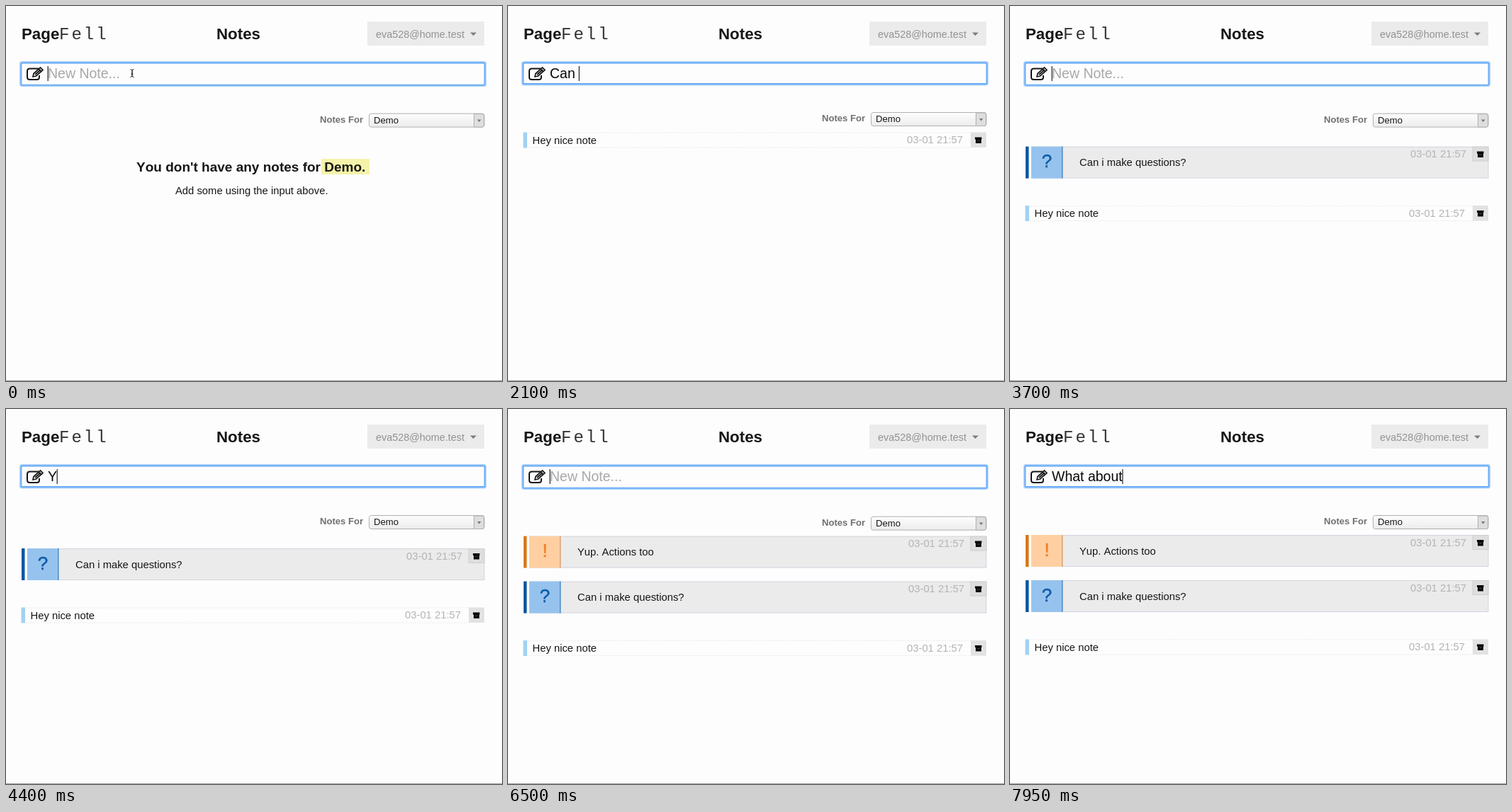
Animation, 700 px wide and 530 px high, one loop 8 s. Source, as an HTML page:

```html
<!DOCTYPE html>
<html lang="en">
<head>
<meta charset="utf-8">
<title>Notes</title>
<style>
  html, body { margin: 0; width: 100%; height: 100%; overflow: hidden; background: #fdfdfd; }
  svg { display: block; width: 700px; height: 530px; }
  text { font: 14.8px "Liberation Sans", Arial, sans-serif; font-kerning: none; fill: #161616; white-space: pre; }
  .bold { font-weight: bold; }
  .heading { font-size: 22.3px; }
  .mono { font: 24px "Liberation Mono", monospace; letter-spacing: 3px; fill: #333; }
  .entry { font-size: 19.5px; fill: #080808; }
  .small { font-size: 13.1px; }
  .date { fill: #b4b4b4; }
  .mark { font-size: 26px; text-anchor: middle; stroke-width: .5px; }
</style>
</head>
<body>
<svg viewBox="0 0 700 530">
  <defs>
    <linearGradient id="selectFill" x1="0" y1="0" x2="0" y2="1">
      <stop offset="0" stop-color="#fdfdfd"/><stop offset="1" stop-color="#ececec"/>
    </linearGradient>
    <g id="archive">
      <path d="M659 7h9.500v3h-9.500zM660 10h8v5.500h-8z" fill="#080808"/>
      <path d="M662.500 11.500h3" stroke="#666" stroke-width=".8"/>
    </g>
  </defs>
  <rect width="700" height="530" fill="#fdfdfd"/>
  <rect y="529" width="700" height="1" fill="#a3a3a3"/>

  <text class="bold heading" x="22" y="47">Page</text>
  <text class="mono" x="75" y="47">Fell</text>
  <text class="bold heading" x="297" y="47">Notes</text>
  <rect x="510" y="22" width="165" height="34" fill="#ebebeb"/>
  <text x="522" y="44.500" style="font-size:14.4px;fill:#929292">eva528@home.test</text>
  <path d="M655 37.500h9l-4.500 4.500z" fill="#7c7c7c"/>

  <rect id="glow" x="21" y="80" width="655" fill="none" stroke="#a9cffb" stroke-width="4" rx="1.500"/>
  <rect id="field" x="21.500" y="80.500" width="654" fill="#fdfdfd" stroke="#68abf6" stroke-width="1.800" rx="1"/>
  <g fill="none" stroke="#161616" stroke-width="2">
    <path d="M46 88.500H33.500q-3.500 0-3.500 3.500v8.500q0 3.500 3.500 3.500h10q3.500 0 3.500-3.500v-2.500"/>
    <path d="M38 100l1-4.500 9.500-8.500 3.500 3.500-9.500 8.500zM46 89l3.500 3.500" stroke-width="1.700"/>
    <path d="M41 97l8-7" stroke-width="1.700"/>
  </g>
  <text id="entry" class="entry" x="59" y="102"></text>
  <rect id="caret" y="85" width="1.200" height="21" fill="#222"/>
  <path id="pointer" d="M175.500 89.500q2.500 0 2.500 2v7q0 2-2.500 2M180.500 89.500q-2.500 0-2.500 2v7q0 2 2.500 2M176.500 96h3" fill="none" stroke="#222"/>

  <g id="page">
    <text class="bold small" x="443" y="163" style="fill:#707070">Notes For</text>
    <rect x="512.500" y="150.500" width="162.500" height="19" rx="3" fill="url(#selectFill)" stroke="#b0b0b0"/>
    <path d="M660.500 151H672q2.500 0 2.500 2.500V167q0 2.500-2.500 2.500h-11.500z" fill="#dedede" stroke="#b0b0b0"/>
    <path d="M665 159h5.500l-2.750 3.500z" fill="#777"/>
    <text class="small" x="519" y="164">Demo</text>
    <g id="blank">
      <rect x="445" y="214.500" width="68" height="22" fill="#f5f3aa"/>
      <text class="bold" x="184" y="232" style="font-size:19px">You don't have any notes for Demo.</text>
      <text x="239" y="264">Add some using the input above.</text>
    </g>
    <g id="rows"></g>
  </g>
</svg>
<script>
const LOOP = 8000, LEAD = 10, BLINK = 250, ENTRY_X = 59;
const $ = id => document.getElementById(id);
const DATE = '03-01 21:57';

const plainRow = text => `
  <path d="M28 .5H653M28 21.500H653" stroke="#ececec" stroke-dasharray="2 1"/>
  <rect x="21.500" width="5.500" height="22" fill="#a2d2f2"/>
  <text x="34.500" y="16">${text}</text>
  <text class="date" x="563" y="15.500">${DATE}</text>
  <rect x="653" width="22" height="21.500" fill="#e2e2e2"/>
  <use href="#archive"/>`;

const markedRow = (text, mark, bar, fill, edge, ink) => `
  <rect x="22" width="4.500" height="45" fill="${bar}"/>
  <rect x="30.500" y=".5" width="644.500" height="44" fill="#ebebeb" stroke="#d3d3df"/>
  <rect x="30" width="44" height="45" fill="${fill}"/>
  <rect x="73" width="1.500" height="45" fill="${edge}"/>
  <text class="mark" x="52" y="29.500" style="fill:${ink};stroke:${ink}">${mark}</text>
  <text x="98" y="27.500">${text}</text>
  <text class="date" x="565" y="15.500">${DATE}</text>
  <path d="M653 .5h22v20h-22z" fill="#dedede" stroke="#cecece"/>
  <use href="#archive"/>`;

// Each row's y for the number of rows shown, oldest row first.
const rows = [
  { html: plainRow('Hey nice note'), y: { 1: 178.5, 2: 280.5, 3: 325.5 } },
  { html: markedRow('Can i make questions?', '?', '#0a56a0', '#96c3ee', '#4488c4', '#0f5ca8'), y: { 2: 197, 3: 242 } },
  { html: markedRow('Yup. Actions too', '!', '#d87818', '#ffcfa2', '#dda06a', '#f0802c'), y: { 3: 178 } }
];
$('rows').innerHTML = rows.map(row => `<g>${row.html}</g>`).join('');
const rowNodes = [...$('rows').children];

const type = (at, end, before, added, notes, after = '') => ({ at, end, before, added, notes, after });
const clear = (at, notes, blinkFrom = at) => ({ ...type(at, at, '', '', notes), blinkFrom });
const ACTION = 'Yup. Actions too';
const moveCaret = (at, pos) => type(at, at, ACTION.slice(0, pos), '', 2, ACTION.slice(pos));

const steps = [
  clear(0, 0, -100),
  type(400, 1000, '', 'Hey nice note', 0),
  clear(1400, 1),
  type(1900, 2250, '', 'Can i ', 1),
  type(2400, 2900, 'Can i ', 'make ', 1),
  type(3100, 3550, 'Can i make ', 'questions?', 1),
  clear(3700, 2),
  type(4400, 4950, '', 'Yup. Actio', 2),
  type(5100, 5350, 'Yup. Actio', 'ns too', 2),
  moveCaret(5500, 13),
  moveCaret(5700, 5),
  moveCaret(5900, 0),
  type(6100, 6200, '', '! ', 2, ACTION),
  clear(6450, 3, 6500),
  type(7400, 7400, '', 'W', 3),
  type(7600, 7950, 'W', 'hat about', 3)
];

const pen = document.createElement('canvas').getContext('2d');
pen.font = '19.5px "Liberation Sans", Arial, sans-serif';
pen.fontKerning = 'none';

function draw(t) {
  const step = steps.filter(s => s.at <= t).pop();
  const span = step.end - step.at;
  const progress = span ? Math.min(1, (t - step.at) / span) : 1;
  const typed = Math.floor(progress * (step.added.length - 1) + 1e-6) + 1;
  const left = step.before + step.added.slice(0, typed);
  const value = left + step.after;
  const shift = value ? 0 : 1.6;

  $('entry').textContent = value || 'New Note...';
  $('entry').style.fill = value ? '' : '#a8a8a8';
  $('glow').setAttribute('height', 30.5 + shift);
  $('field').setAttribute('height', 29.5 + shift);
  $('page').setAttribute('transform', `translate(0 ${shift})`);
  $('pointer').style.display = t < 400 ? '' : 'none';

  const idle = Math.max(0, t - (step.blinkFrom ?? Math.min(t, step.end)));
  $('caret').style.display = Math.floor(idle / BLINK) % 2 ? 'none' : '';
  $('caret').setAttribute('x', ENTRY_X - 0.4 + pen.measureText(left).width);

  $('blank').style.display = step.notes ? 'none' : '';
  rows.forEach((row, i) => {
    const y = row.y[step.notes];
    rowNodes[i].style.display = y ? '' : 'none';
    if (y) rowNodes[i].setAttribute('transform', `translate(0 ${y})`);
  });
}

const start = performance.now();
function tick() {
  draw((performance.now() - start) % LOOP + LEAD);
  requestAnimationFrame(tick);
}
tick();
</script>
</body>
</html>
```
